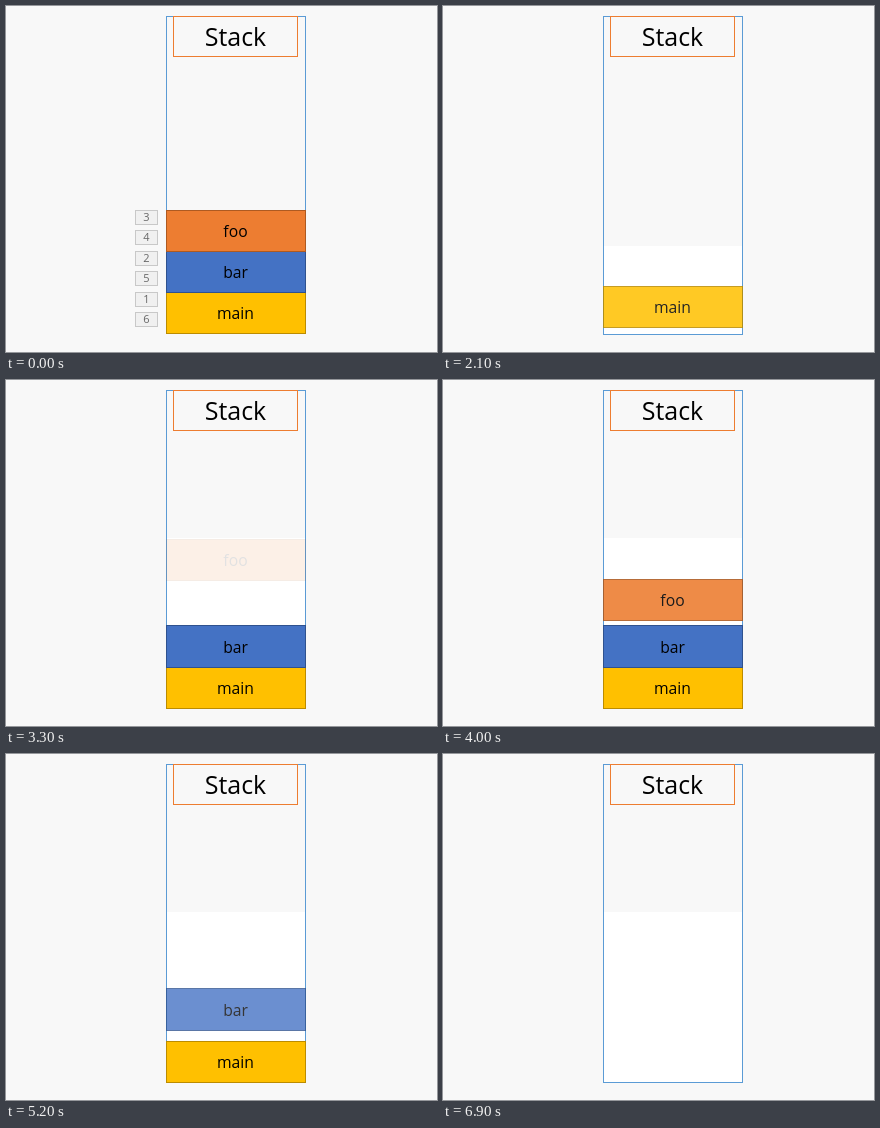
An HTML page that plays this animation: 431x346 px, repeating every 7.3 s.

```html
<!DOCTYPE html>
<html lang="en">
<head>
<meta charset="utf-8">
<title>Call stack</title>
<style>
  html, body { margin: 0; width: 100%; height: 100%; overflow: hidden; background: #f8f8f8; }
  svg { display: block; width: 431px; height: 346px; }
  text { font-family: "Open Sans", "Noto Sans", sans-serif; text-anchor: middle; }
  .block text { font-size: 15.7px; }
  .label text { font-size: 11px; fill: #666; }
</style>
</head>
<body>
<svg id="stage" viewBox="0 0 431 346"></svg>
<script>
const LOOP = 7300, STEP = 100, START = 1300;
const TRAVEL = 51, FADE = 900;

// rest: top edge once settled; enter/exit: when each float begins
const BLOCKS = [
  { name: "main", fill: "#ffc000", line: "#bc8c00", top: 286, rest: 287.2, height: 41, enter: 1330, exit: 5962 },
  { name: "bar",  fill: "#4472c4", line: "#2f528f", top: 245, rest: 245,   height: 42, enter: 2265, exit: 5010 },
  { name: "foo",  fill: "#ed7d31", line: "#ae5a21", top: 204, rest: 204.4, height: 41, enter: 3200, exit: 4080 },
];
// The area that blocks have crossed turns white: [time, top edge]
const CLEARED = [[1400, 240], [2400, 202], [3300, 158]];
const LABELS = [[3, 204], [4, 224], [2, 245], [5, 265], [1, 286], [6, 306]];

const stage = document.getElementById("stage");

function add(parent, tag, attrs, content = "") {
  const el = document.createElementNS("http://www.w3.org/2000/svg", tag);
  for (const key in attrs) el.setAttribute(key, attrs[key]);
  el.textContent = content;
  return parent.appendChild(el);
}

function box(parent, x, y, width, height, stroke, fill = "none") {
  return add(parent, "rect", { x: x + .5, y: y + .5, width, height, stroke, fill });
}

const cleared = add(stage, "rect", { x: 161, width: 138, fill: "#fff" });
const frame = box(stage, 160, 10, 139, 318, "#5b9bd5");
box(stage, 167, 10, 124, 40, "#ed7d31");
add(stage, "text", { x: 229.5, y: 40, "font-size": 25 }, "Stack");

const labels = add(stage, "g", { class: "label" });
for (const [number, y] of LABELS) {
  box(labels, 129, y, 22, 14, "#c8c8c8", "#f0f0f0");
  add(labels, "text", { x: 140.5, y: y + 11 }, number);
}

for (const block of BLOCKS) {
  block.group = add(stage, "g", { class: "block" });
  block.rect = box(block.group, 160, 0, 139, 41, block.line, block.fill);
  block.text = add(block.group, "text", { x: 229.5 }, block.name);
}

const clamp = v => Math.max(0, Math.min(1, v));

function place(block, y, height, opacity) {
  block.rect.setAttribute("y", y + .5);
  block.rect.setAttribute("height", height);
  block.text.setAttribute("y", y + height - 14);
  block.group.setAttribute("opacity", opacity);
}

function draw(t) {
  const still = t < START;
  labels.setAttribute("visibility", still ? "visible" : "hidden");
  frame.setAttribute("height", still ? 317 : 318);

  let top = 328;
  for (const [time, y] of CLEARED) if (t >= time) top = y;
  cleared.setAttribute("y", top);
  cleared.setAttribute("height", 328 - top);

  for (const block of BLOCKS) {
    if (still) {
      place(block, block.top, 41, 1);
      continue;
    }
    const p = Math.min(clamp((t - block.enter) / FADE), 1 - clamp((t - block.exit) / FADE));
    place(block, Math.round(block.rest - TRAVEL * (1 - p)), block.height, p > .05 ? p : 0);
  }
}

const begin = performance.now();
function tick() {
  const t = (performance.now() - begin) % LOOP;
  draw(Math.floor(t / STEP) * STEP);
  requestAnimationFrame(tick);
}
tick();
</script>
</body>
</html>
```
